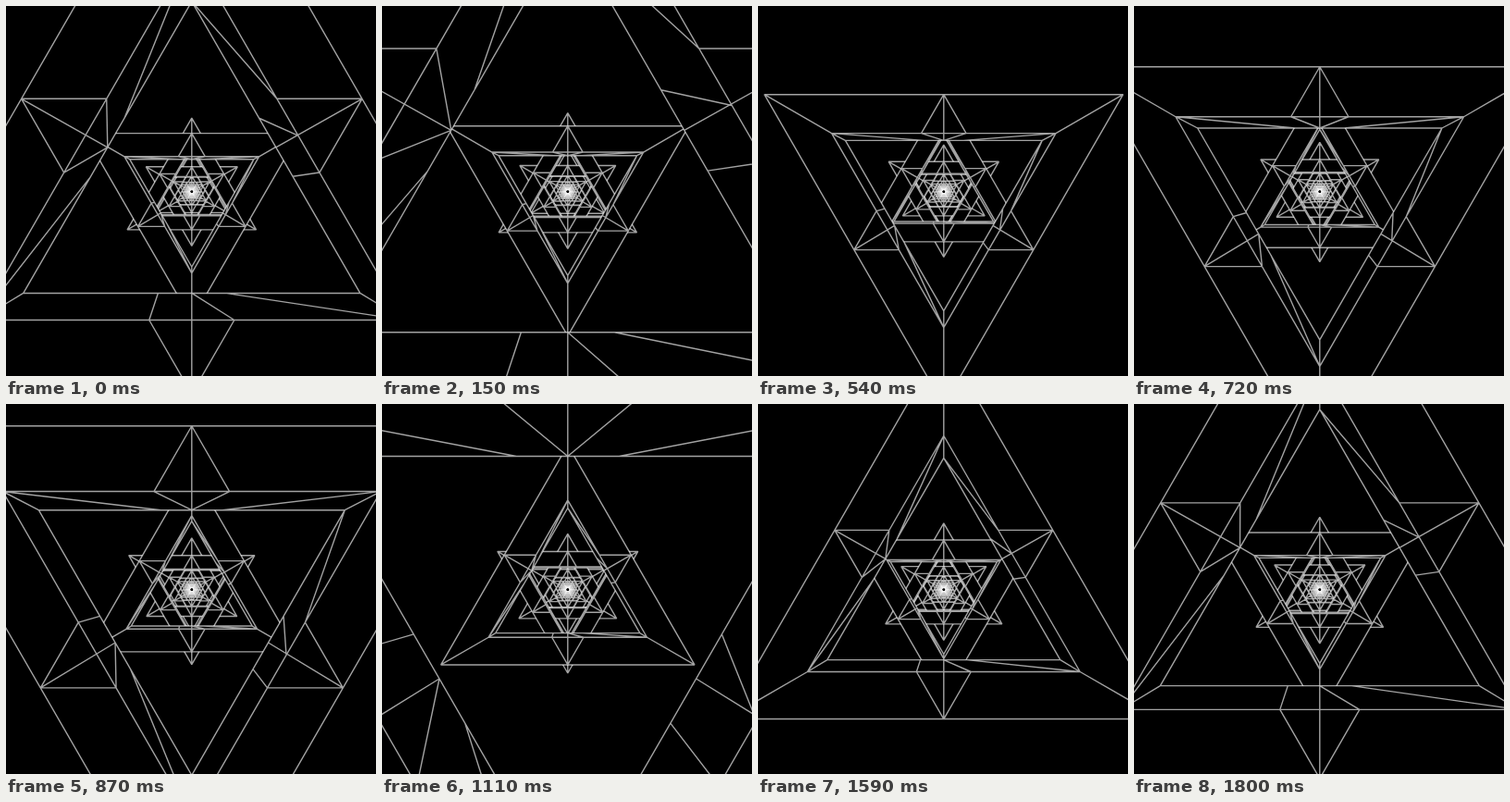
Recreate the animation shown at these times as an HTML page with a canvas. Size 400 by 400 pixels, loop 1830 ms.

```html
<!DOCTYPE html>
<html lang="en">
<head>
<meta charset="utf-8">
<title>Triangle tunnel</title>
<style>
  html, body { margin: 0; width: 100%; height: 100%; overflow: hidden; background: #000; }
  canvas { display: block; width: 400px; height: 400px; }
</style>
</head>
<body>
<canvas id="stage" width="400" height="400"></canvas>
<script>
const ctx = document.getElementById('stage').getContext('2d');

const LOOP = 1830, STEP = 30;
const DEPTH = 113;           // thickness of a frame, as travel time
const FOCAL = 113500;
const CX = 200.8, CY = 200.5;
const OUTER = 1.6;           // outer triangle relative to the opening
const PAIRS = 15;

// pass: time at which the first frame of a kind is passed; shift: its height off the axis.
const UP = { dir: 1, pass: 427, shift: 0.023 };
const DOWN = { dir: -1, pass: 1351, shift: 0.051 };

const mix = (p, q, u) => [p[0] + (q[0] - p[0]) * u, p[1] + (q[1] - p[1]) * u];

// Corners run apex, right, left.
function triangle(z, size, { dir, shift }) {
  const s = FOCAL / z;
  return [[0, -1], [0.866, 0.5], [-0.866, 0.5]].map(([x, y]) =>
    [CX + s * size * x, CY + s * (size * y * dir + shift)]);
}

function line(...points) {
  points.forEach(([x, y], i) => i ? ctx.lineTo(x, y) : ctx.moveTo(x, y));
}

function ring(points) {
  line(...points);
  ctx.closePath();
}

// One side of a frame: the point on its face and the creases on the inner wall.
function side(outer, front, back, i, j, type) {
  const f = u => mix(front[i], front[j], u);
  const b = u => mix(back[i], back[j], u);
  const tip = mix(outer[i], outer[j], 0.5);

  line(f(0.4), tip, f(0.6));
  line(tip, b(0.5));

  if (type === 'even') {
    line(f(0.4), b(0.5), f(0.6));
    line(b(0.4), front[i]);
    line(b(0.6), front[j]);
  } else if (type === 'left') {
    line(f(0.4), b(0.4));
    line(f(0.6), b(0.5));
    line(b(0.6), front[j]);
  } else {
    line(back[i], f(0.4));
    line(b(0.4), f(0.5));
    line(f(0.6), b(0.6));
  }
}

function frame(z, kind) {
  const outer = triangle(z, OUTER, kind);
  const front = triangle(z, 1, kind);
  const back = triangle(z + DEPTH, 1, kind);

  ctx.beginPath();
  ring(outer);
  ring(back);
  ctx.fill('evenodd');

  ctx.beginPath();
  [outer, front, back].forEach(ring);
  outer.forEach((p, i) => line(p, front[i], back[i]));
  if (kind === UP) {
    side(outer, front, back, 0, 2, 'even');
    side(outer, front, back, 2, 1, 'left');
    side(outer, front, back, 0, 1, 'right');
  } else {
    side(outer, front, back, 2, 1, 'even');
    side(outer, front, back, 2, 0, 'left');
    side(outer, front, back, 1, 0, 'right');
  }
  ctx.stroke();
}

function draw(time) {
  ctx.fillStyle = '#000';
  ctx.fillRect(0, 0, 400, 400);
  ctx.strokeStyle = 'rgba(255, 255, 255, 0.64)';
  ctx.lineWidth = 1.4;
  ctx.lineJoin = 'bevel';

  const frames = [];
  for (const kind of [UP, DOWN]) {
    const ahead = kind.pass - time;
    const nearest = ahead > STEP ? ahead : ahead + LOOP;
    for (let k = 0; k < PAIRS; k++) frames.push([nearest + k * LOOP, kind]);
  }
  frames.sort((p, q) => q[0] - p[0]);
  frames.forEach(([z, kind]) => frame(z, kind));
}

const start = performance.now();
function tick() {
  const t = (performance.now() - start) % LOOP;
  draw(Math.floor(t / STEP) * STEP);
  requestAnimationFrame(tick);
}
tick();
</script>
</body>
</html>
```
